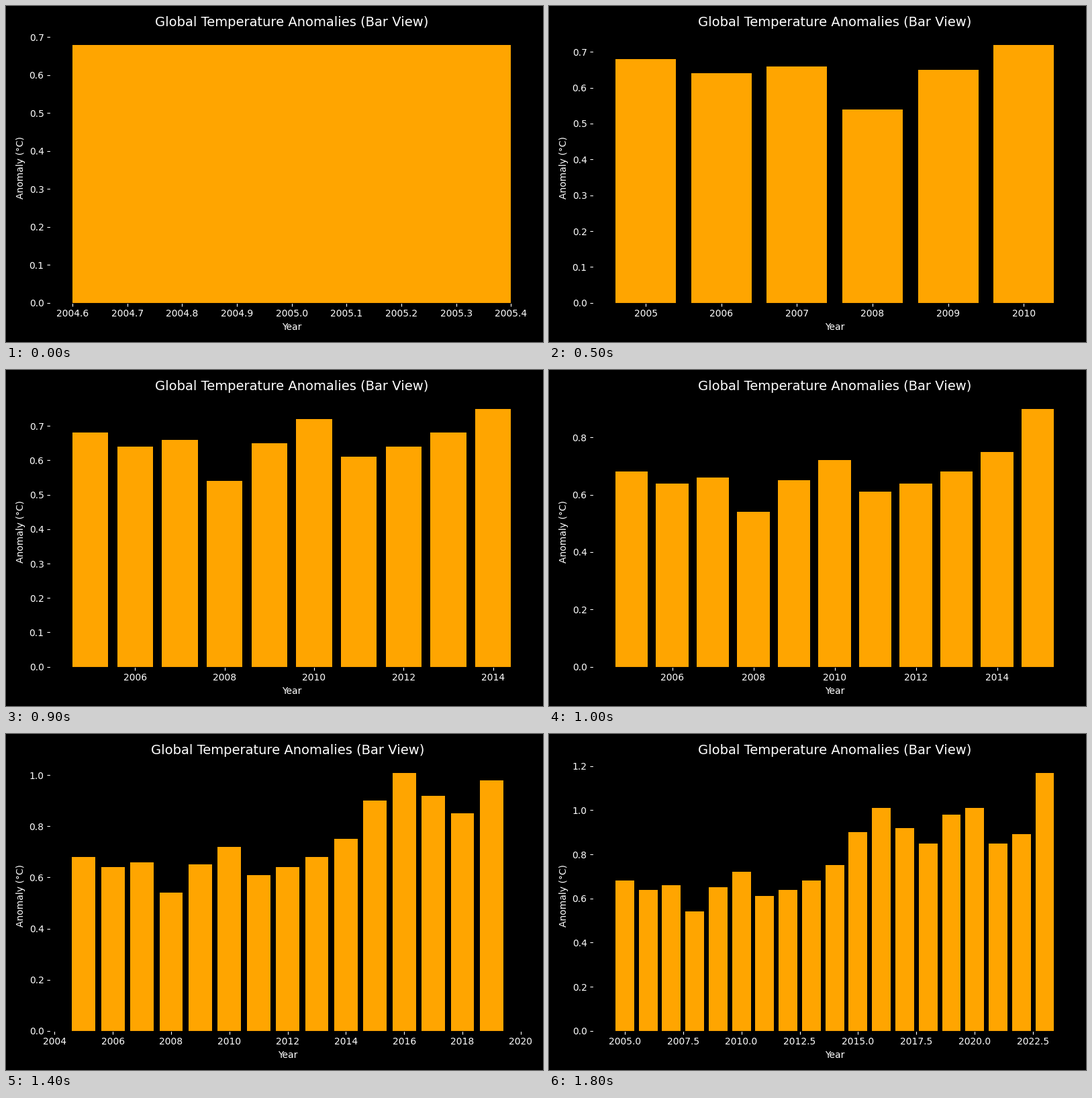
Recreate the animation shown at these times as a matplotlib script. Size 800x500 px, loop 1900 ms.

```python
import matplotlib.pyplot as plt
from matplotlib.animation import FuncAnimation

FIRST_YEAR = 2005
ANOMALIES = [0.68, 0.64, 0.66, 0.54, 0.65, 0.72, 0.61, 0.64, 0.68, 0.75,
             0.90, 1.01, 0.92, 0.85, 0.98, 1.01, 0.85, 0.89, 1.17]
YEARS = [FIRST_YEAR + i for i in range(len(ANOMALIES))]

plt.rcParams["font.family"] = "DejaVu Sans"
fig, ax = plt.subplots(figsize=(8, 5), dpi=100, facecolor="black")


def update(i):
    """Show one more year per step, with the axes rescaled to fit."""
    ax.clear()
    ax.set_facecolor("black")
    ax.bar(YEARS[:i + 1], ANOMALIES[:i + 1], color="orange")
    ax.set_title("Global Temperature Anomalies (Bar View)",
                 color="white", fontsize=14)
    ax.set_xlabel("Year", color="white")
    ax.set_ylabel("Anomaly (°C)", color="white")
    ax.tick_params(colors="white")

    # Start from the default margins so the layout depends on i alone.
    fig.subplots_adjust(left=0.125, right=0.9, bottom=0.11, top=0.88)
    fig.tight_layout()
    return ax.patches


anim = FuncAnimation(fig, update, frames=len(YEARS), init_func=lambda: [],
                     interval=100, repeat=True, repeat_delay=0, blit=False)
plt.show()
```
